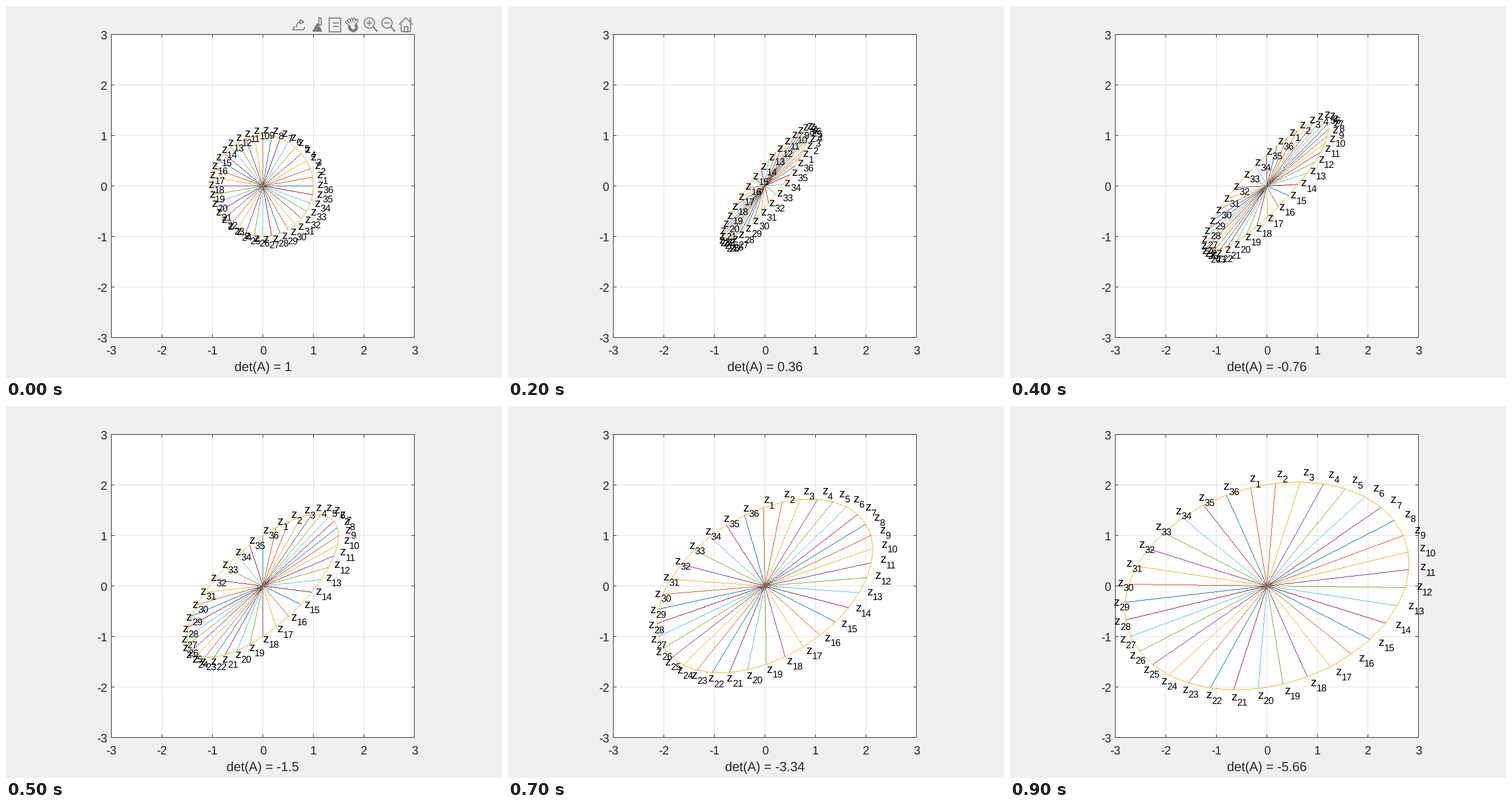
A matplotlib script for the animation above (1 s loop, 864 by 648 pixels).

```python
import numpy as np
import matplotlib.pyplot as plt
from matplotlib.animation import FuncAnimation
from matplotlib.colors import to_rgba
from matplotlib.patches import Arc, Circle, Rectangle, RegularPolygon

WIDTH, HEIGHT, DPI = 864, 648, 100
LEFT, TOP, SIDE = 183, 49, 528
RIGHT, BOTTOM = LEFT + SIDE, TOP + SIDE
UNIT = SIDE / 6
CENTER = np.array([LEFT + SIDE / 2, TOP + SIDE / 2])
COUNT, FRAMES, INTERVAL = 36, 10, 100
LABEL_REACH = 1.08
TICK_SIZE, SUB_SIZE, TITLE_SIZE = 20.6, 16.5, 22.6
PX = 72 / DPI
BACK, INK, ICON = "#f0f0f0", "#262626", "#7b7b7b"
COLORS = ["#0072BD", "#D95319", "#EDB120", "#7E2F8E",
          "#77AC30", "#4DBEEE", "#A2142F"]

plt.rcParams["font.family"] = "Liberation Sans"
plt.rcParams["text.hinting"] = "none"

fig = plt.figure(figsize=(WIDTH / DPI, HEIGHT / DPI), dpi=DPI, facecolor=BACK)
ax = fig.add_axes([0, 0, 1, 1])
ax.axis("off")
canvas = ax.imshow(np.zeros((HEIGHT, WIDTH, 4)), aspect="auto",
                   interpolation="nearest", zorder=3)
ax.set_xlim(-0.5, WIDTH - 0.5)
ax.set_ylim(HEIGHT - 0.5, -0.5)


def line(xs, ys, color=INK, width=1, z=2, cap="projecting"):
    return ax.plot(xs, ys, color=color, lw=width * PX, snap=False, zorder=z,
                   solid_capstyle=cap)[0]


def text(x, y, s, size, color=INK, ha="left"):
    return ax.text(x, y, s, fontsize=size * PX, color=color, ha=ha,
                   va="baseline", zorder=6)


def draw_axes():
    ax.add_patch(Rectangle((LEFT, TOP), SIDE, SIDE, fc="white", lw=0, zorder=0))
    for v in range(-3, 4):
        x, y = CENTER + UNIT * np.array([v, -v])
        if abs(v) < 3:
            line([x, x], [TOP, BOTTOM], "#dfdfdf", z=1)
            line([LEFT, RIGHT], [y, y], "#dfdfdf", z=1)
        line([x, x], [TOP, TOP + 5])
        line([x, x], [BOTTOM, BOTTOM - 5])
        line([LEFT, LEFT + 5], [y, y])
        line([RIGHT, RIGHT - 5], [y, y])
        text(x, BOTTOM + 29.5, str(v), TICK_SIZE, ha="center")
        text(LEFT - 7.5, y + 8, str(v), TICK_SIZE, ha="right")
    line([LEFT, RIGHT, RIGHT, LEFT, LEFT], [TOP, TOP, BOTTOM, BOTTOM, TOP])


def draw_toolbar():
    export, brush, tip, hand, zoom_in, zoom_out, home = np.linspace(511, 696, 7)
    mid = 32
    parts = []

    def stroke(x, xs, ys, width=1.8, color=ICON, cap="butt"):
        parts.append(line(x + np.array(xs), mid + np.array(ys), color, width,
                          cap=cap))

    def shape(patch, filled=False):
        patch.set(fc=ICON if filled else "none", ec=ICON, lw=1.8 * PX, zorder=2)
        parts.append(ax.add_patch(patch))

    def box(x, half, top, bottom, filled=False):
        shape(Rectangle((x - half, mid + top), 2 * half, bottom - top), filled)

    stroke(export, [-9, -12, 7, 9], [3, 9, 9, 4])
    shape(Arc((export + 2, mid + 5), 16, 20, theta1=180, theta2=270))
    shape(RegularPolygon((export + 3, mid - 5), 3, radius=4,
                         orientation=-np.pi / 2))

    box(brush + 5, 2, -12, 0)
    shape(RegularPolygon((brush, mid + 7), 3, radius=9, orientation=np.pi), True)

    box(tip, 10, -12, 12)
    for y in (-3, 3):
        stroke(tip, [-4, 7], [y, y])

    # A wide dark hand under a narrower light one leaves its outline.
    for color, width in ((ICON, 5.5), (BACK, 2.2)):
        for angle in np.radians(np.linspace(-50, 32, 5)):
            stroke(hand, [0, 13.5 * np.sin(angle)], [4, 4 - 13.5 * np.cos(angle)],
                   width, color, "round")
        stroke(hand, [0, 1], [4, 5], 3 * width, color, "round")

    for x in (zoom_in, zoom_out):
        shape(Circle((x - 2, mid - 3), 9))
        stroke(x - 2, [6, 14], [3, 12], 2.4)
        stroke(x - 2, [-5, 5], [-3, -3])
    stroke(zoom_in - 2, [0, 0], [-8, 2])

    stroke(home, [-12, 0, 12], [0, -12, 0])
    stroke(home, [-8, -8, 8, 8], [-2, 12, 12, -2])
    box(home, 3, 3, 12)
    stroke(home, [8, 8], [-12, -5], 2.5)
    return parts


def to_pixels(points):
    return CENTER + UNIT * points * [1, -1]


def paint_segment(image, start, end, color):
    """Colour one pixel per step along the longer axis."""
    steps = int(np.ceil(np.abs(end - start).max())) + 1
    cols, rows = np.rint(np.linspace(start, end, steps)).astype(int).T
    image[rows, cols] = to_rgba(color)


draw_axes()
toolbar = draw_toolbar()

# The last point repeats the first, so its spoke covers the first one.
theta = np.radians(10) * np.arange(1, COUNT + 2)
circle = np.column_stack([np.cos(theta), np.sin(theta)])
labels = [(text(0, 0, "z", TICK_SIZE, "black"),
           text(0, 0, str(n), SUB_SIZE, "black")) for n in range(1, COUNT + 1)]
title = text(CENTER[0], 635.5, "", TITLE_SIZE, ha="center")


def update(k):
    matrix = np.eye(2) + 0.1 * k * np.array([[-2, 3], [2, 0]])
    points = circle @ matrix.T
    tips = to_pixels(points)

    image = np.zeros((HEIGHT, WIDTH, 4))
    for i, tip in enumerate(tips):
        paint_segment(image, CENTER, tip, COLORS[i % len(COLORS)])
    for start, end in zip(tips, tips[1:]):
        paint_segment(image, start, end, COLORS[len(tips) % len(COLORS)])
    canvas.set_data(image)

    for (letter, sub), (x, y) in zip(labels, to_pixels(LABEL_REACH * points)):
        letter.set_position((x, y + 3.5))
        sub.set_position((x + TICK_SIZE / 2, y + 13))
    title.set_text(f"det(A) = {round(np.linalg.det(matrix), 2):g}")
    for part in toolbar:
        part.set_visible(k == 0)
    return [canvas, title, *toolbar]


anim = FuncAnimation(fig, update, frames=FRAMES, interval=INTERVAL,
                     repeat=True, repeat_delay=0, blit=False)
plt.show()
```
